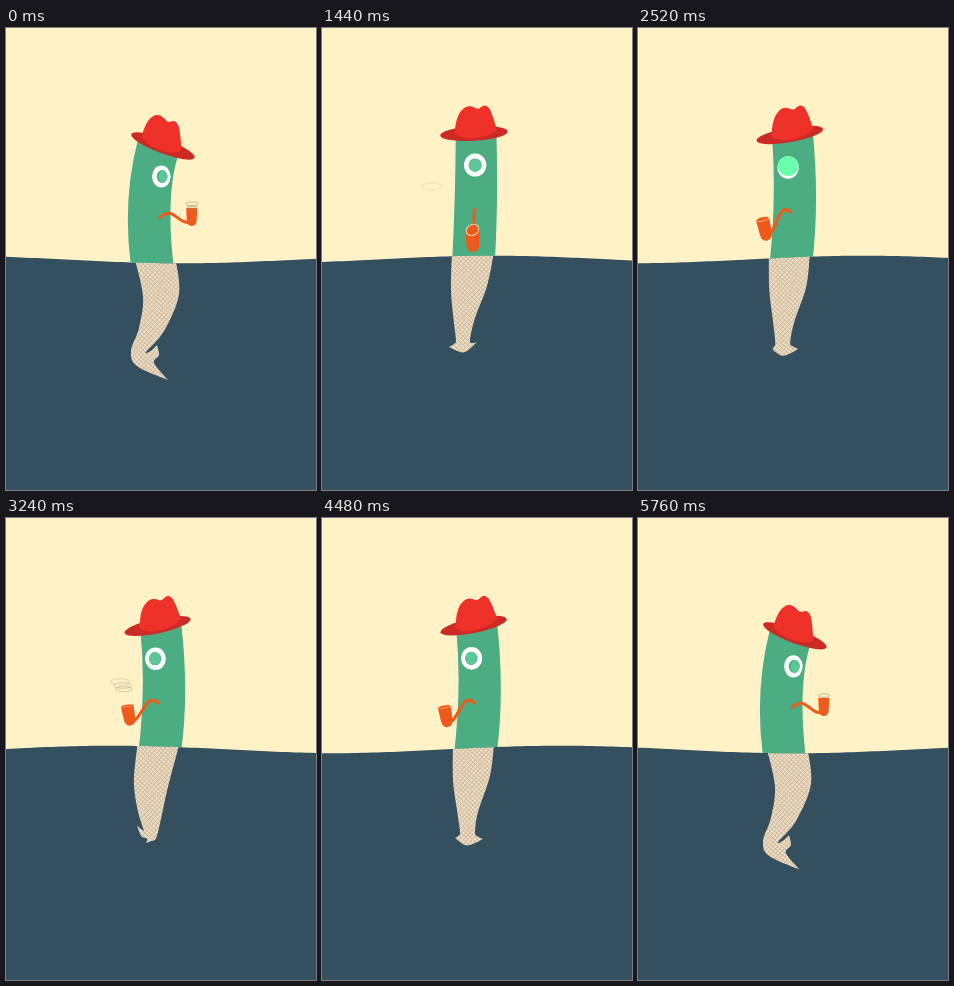
Write an HTML page that moves like this. It is 310x462 px and loops after 5800 ms.

```html
<!DOCTYPE html>
<html lang="en">
<head>
<meta charset="utf-8">
<title>Sea swimmer</title>
<style>
  html, body { margin: 0; width: 100%; height: 100%; overflow: hidden; background: #fff2c6; }
  svg { display: block; width: 100vw; height: 100vh; }
</style>
</head>
<body>
<svg viewBox="0 0 310 462" xmlns="http://www.w3.org/2000/svg">
  <defs>
    <pattern id="net" width="3.2" height="3.2" patternUnits="userSpaceOnUse" patternTransform="rotate(42)">
      <rect width="3.2" height="3.2" fill="#efdfc6"/>
      <path d="M0 0H3.2M0 0V3.2" stroke="#c4af92" stroke-width="1.3"/>
    </pattern>
    <clipPath id="below"><path id="belowPath"/></clipPath>
    <clipPath id="above"><path id="abovePath"/></clipPath>
    <clipPath id="eyeClip"><ellipse id="eyeClipShape"/></clipPath>
    <clipPath id="holeClip"><ellipse id="holeClipShape"/></clipPath>
  </defs>
  <rect width="310" height="462" fill="#fff2c6"/>
  <path id="sea" fill="#344f5d"/>
  <g clip-path="url(#below)"><path id="tail" fill="url(#net)"/></g>
  <g clip-path="url(#above)"><path id="body" fill="#4cac82"/></g>
  <ellipse id="eye" fill="#fff"/>
  <ellipse id="hole" fill="#4cac82"/>
  <g clip-path="url(#holeClip)"><ellipse id="iris" fill="#5dc797"/></g>
  <g clip-path="url(#eyeClip)"><ellipse id="lid" fill="#69ffab"/></g>
  <g id="hat">
    <ellipse rx="33.8" ry="7.3" fill="#cc2a25"/>
    <path id="crown" fill="#ee3129" d="M-20 -1C-19 -10 -17 -20 -12 -24C-9 -27.500 -5 -28 -2 -27C1 -26 3 -24 5 -24.500C7 -25 9 -28 12 -27C16 -25.500 17 -21 19 -15L22.500 -2C14 6 -11 7.500 -20 -1Z"/>
  </g>
  <path id="stem" fill="none" stroke="#f0591c" stroke-width="3" stroke-linecap="round"/>
  <g id="bowl">
    <path id="cup" fill="#f0591c"/>
    <ellipse id="rim" fill="#f0591c" stroke="#fbe3bd" stroke-width="1"/>
  </g>
  <g id="smoke" fill="none" stroke="#9d947a" stroke-width=".8"></g>
</svg>
<script>
const LOOP = 5800, SWING = LOOP / 3;
const TAU = Math.PI * 2;
const $ = id => document.getElementById(id);
const set = (id, attrs) => {
  const el = typeof id === 'string' ? $(id) : id;
  for (const k in attrs) el.setAttribute(k, attrs[k]);
};
const lerp = (a, b, k) => a + (b - a) * k;

// Piecewise linear lookup; stops ascending
function sample(stops, values, x) {
  let i = 0;
  while (i < stops.length - 2 && x > stops[i + 1]) i++;
  const k = (x - stops[i]) / (stops[i + 1] - stops[i]);
  const a = values[i], b = values[i + 1];
  return Array.isArray(a) ? a.map((v, n) => lerp(v, b[n], k)) : lerp(a, b, k);
}

// Tail outlines: x,y pairs clockwise from the top left
const tailRight = [128,228, 137,268, 133,300, 125,323, 131,338, 162,352, 148,335,
  153,327, 151,317, 146,322, 140,324, 158,303, 173,266, 169,228];
const tailRising = [130,224, 129,262, 132,295, 134,312, 132,316, 127,319, 138,324,
  145,323, 155,314, 151,315, 148,312, 153,290, 165,258, 172,224];
const tailFalling = [131,226, 131,262, 135,292, 138,314, 136,318, 133,320, 143,327,
  151,326, 161,321, 155,318, 153,314, 156,294, 168,258, 172,226];
const tailReturn = [133,225, 127,264, 131,288, 137,301, 142,310, 134,298, 133,313,
  138,319, 128,334, 140,330, 152,326, 157,308, 159,280, 175,226];
const tailLeft = [135,226, 125,264, 131,292, 140,308, 146,316, 135,305, 134,320,
  140,327, 127,343, 145,337, 157,330, 161,312, 158,282, 176,226];

// Smooth curve through points from..to, with sharp ends
function curve(p, from, to) {
  const at = i => { i = Math.max(from, Math.min(to, i)); return [p[2 * i], p[2 * i + 1]]; };
  let d = '';
  for (let i = from; i < to; i++) {
    const [a, b, c, e] = [at(i - 1), at(i), at(i + 1), at(i + 2)];
    d += `C${b.map((v, n) => v + (c[n] - a[n]) / 6)} ${c.map((v, n) => v - (e[n] - b[n]) / 6)} ${c}`;
  }
  return d;
}

function drawSea(phase) {
  let line = '';
  for (let x = 0; x <= 310; x += 5) {
    const y = 231.5 + 3.8 * Math.cos(TAU * ((x - 175) / 470 - 2 * phase));
    line += `${x ? 'L' : 'M'}${x} ${y.toFixed(2)}`;
  }
  set('sea', { d: line + 'V462H0Z' });
  set('belowPath', { d: line + 'V462H0Z' });
  set('abovePath', { d: line + 'V0H0Z' });
}

function drawTail(phase, swing) {
  const p = phase < .5
    ? sample([-1, -.41, 1], [tailLeft, tailFalling, tailRight], swing)
    : sample([-1, -.78, -.03, 1], [tailLeft, tailReturn, tailRising, tailRight], swing);
  set('tail', { d: `M${p[0]} ${p[1]}` + curve(p, 0, 5) + curve(p, 5, 8) + curve(p, 8, 13) + 'Z' });
}

function drawBodyAndHat(c) {
  const tilt = sample([-1, -.78, -.33, -.03, 1], [-21, -17.3, -10, -3.5, 20.5], c);
  const hatX = 152 + 5 * c ** 3, hatY = 105.5 + 12.5 * c * c;
  const slope = 20 * Math.tan(tilt * Math.PI / 180);
  const topX = 154 - 1.5 * c, midX = 153.5 - 10 * c, endX = 151 - 4.5 * c;
  const edge = side => {
    const top = [topX + side * 20.3, hatY + side * slope];
    const end = [endX + side * 21.3, 240];
    const mid = [midX + side * 21.2, 174];
    return { top, end, ctrl: mid.map((v, n) => 2 * v - (top[n] + end[n]) / 2) };
  };
  const l = edge(-1), r = edge(1);
  set('body', { d: `M${l.top}Q${l.ctrl} ${l.end}L${r.end}Q${r.ctrl} ${r.top}Z` });
  set('hat', { transform: `translate(${hatX} ${hatY}) rotate(${tilt})` });
  set('crown', { transform: `translate(${-.15 * tilt} 0) skewX(${.55 * tilt})` });
}

function drawEye(c, time) {
  const a = Math.abs(c);
  const cx = 153.5 + 4.3 * Math.sin(2.7 * c), cy = 137 + 11.5 * a ** 1.4;
  const ball = { cx, cy, rx: 11.3 - 2 * a, ry: 11.5 - .5 * a };
  const hole = { cx: cx + .8 * c, cy, rx: 6.6 - 1.2 * a, ry: 6.7 - .2 * a };
  set('eye', ball);
  set('eyeClipShape', ball);
  set('hole', hole);
  set('holeClipShape', hole);
  set('iris', { ...hole, cx: hole.cx + 1.8 * c });
  const shut = Math.max(0, 1 - Math.abs(time - 2550) / 130);
  set('lid', { ...ball, cy: cy - 23 * (1 - Math.min(1, shut * 1.13)) , visibility: shut ? 'visible' : 'hidden' });
}

function drawPipe(c) {
  const side = c < 0 ? -1 : 1, a = Math.abs(c);
  const [off, top, bottom, half, rimRy, turn] = sample([0, .333, .487, .782, 1], [
    [0, 203, 225, 7, 5.6, 0], [28.5, 191, 213, 6.7, 2, 13], [33, 186.5, 206, 6.2, .9, 9],
    [34, 182.5, 200, 5.8, .4, 3], [32.7, 180, 198, 5.5, .3, 0]], a);
  const x = 153 + side * off, h = bottom - top;
  const mouthX = 153 + c, mouthY = 181 + 8.5 * Math.min(1, a * 1.1);
  const reach = Math.min(1, off / 28);
  set('bowl', { transform: `translate(${x} ${top}) rotate(${side * turn})` });
  set('cup', { d: `M${-half} 0L${.5 - half} ${.6 * h}Q${.5 - half} ${h} 0 ${h}Q${half - .5} ${h} ${half - .5} ${.6 * h}L${half} 0Z` });
  set('rim', { rx: half - .4, ry: rimRy, transform: `rotate(${-32 * Math.max(0, 1 - 3 * a)})`,
    'stroke-opacity': Math.max(0, 1 - 1.5 * a) });
  set('stem', { d: `M${x} ${bottom - 3.5}C${x - side * 15 * reach} ${bottom - 1 - 8 * (1 - reach)} ` +
    `${mouthX + side * 14 * reach} ${mouthY - 13 * reach} ${mouthX} ${mouthY}` });
}

const RINGS = 3;
const rings = Array.from({ length: 2 * RINGS }, () =>
  $('smoke').appendChild(document.createElementNS('http://www.w3.org/2000/svg', 'ellipse')));

function drawSmoke(phase) {
  rings.forEach((ring, i) => {
    const right = i < RINGS, n = i % RINGS;
    const age = (phase - (right ? .95 : .45) + 1) % 1 - n * .045;
    const alive = age > 0 && age < (n ? .2 : .33);
    const drift = 60 * Math.max(0, age - .16);
    set(ring, {
      visibility: alive ? 'visible' : 'hidden',
      cx: right ? 186 + drift : 118 - drift,
      cy: (right ? 180 : 182) - 80 * age,
      rx: Math.max(0, Math.min(9.6, 5 + 22 * age)),
      ry: Math.max(0, Math.min(3.5, 1.6 + 7 * age)),
      opacity: Math.max(.05, .85 - 2 * age)
    });
  });
}

function draw(time) {
  const phase = time % SWING / SWING;
  const swing = Math.cos(TAU * phase);
  drawSea(phase);
  drawTail(phase, swing);
  drawBodyAndHat(swing);
  drawEye(swing, time);
  drawPipe(swing);
  drawSmoke(phase);
}

const start = performance.now();
function tick() {
  draw((performance.now() - start) % LOOP);
  requestAnimationFrame(tick);
}
tick();
</script>
</body>
</html>
```
